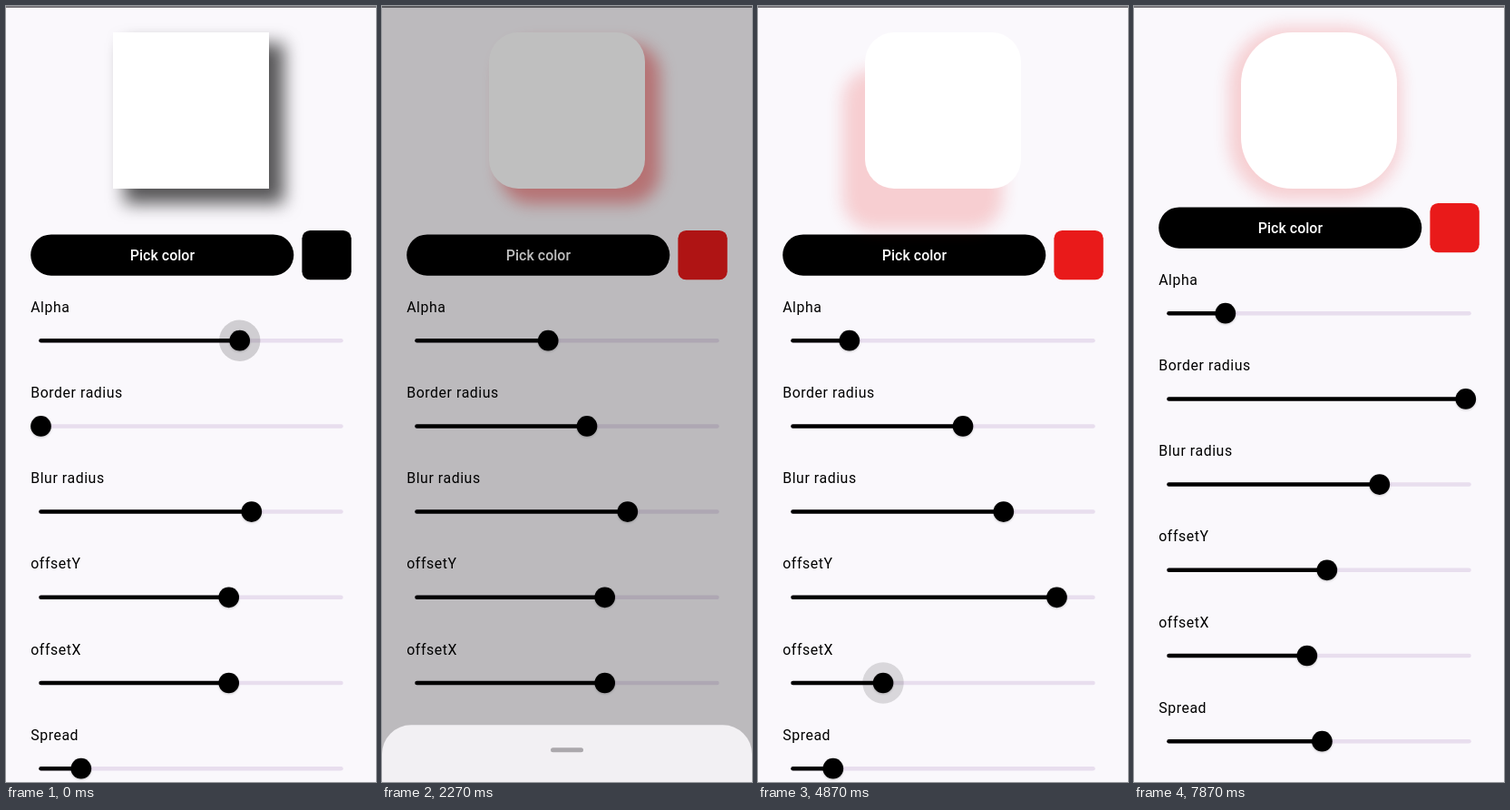
An HTML page for the animation above (8 s loop, 408x854 px).

```html
<!DOCTYPE html>
<html lang="en">
<head>
<meta charset="utf-8">
<title>Shadow playground</title>
<style>
  html, body { margin: 0; width: 100%; height: 100%; overflow: hidden; background: #faf8fc; }
  #stage { position: relative; width: 408px; height: 854px; overflow: hidden; }
  #stage div { position: absolute; box-sizing: border-box; }
  #panel { position: absolute; left: 0; top: 0; font: 15.87px Roboto, sans-serif; }
  .label { letter-spacing: .57px; }
  .caption { fill: #fff; font-weight: 500; letter-spacing: .06px; text-anchor: middle; }
  .track, .active { stroke: #e8deee; stroke-width: 4.53; stroke-linecap: round; }
  .active { stroke: #000; }
  .thumb { filter: drop-shadow(0 1px 1px #0003); }
  #box { left: 118px; top: 29px; width: 172px; height: 172px; background: #fff; }
  #bar { left: 0; top: 0; width: 408px; height: 2px; background: #77757a; }
  #scrim { inset: 0; background: #000; }
  #sheet { left: 0; top: 0; width: 408px; height: 461px; border-radius: 32px 32px 0 0; background: #f2f0f3; }
  #grip { left: 186px; top: 25px; width: 36px; height: 5px; border-radius: 3px; background: #aba8ac; }
  #shades, #hues, #opacity { border: 1px solid #999; }
  #shades { left: 27px; top: 72px; width: 309px; height: 328px; background: linear-gradient(#0000, #000), linear-gradient(90deg, #fff, #f00); }
  #hues { left: 344px; top: 72px; width: 37px; height: 375px; background: linear-gradient(#ff005c, #f0f 11%, #00f 28.8%, #0ff 46.6%, #0f0 64.4%, #ff0 82.2%, #f00); }
  #opacity { left: 27px; top: 408px; width: 309px; height: 38px; }
  .handle { border: 2px solid #fff; outline: 1px solid #777; border-radius: 1px; }
  #hueHandle { left: 343px; top: 441px; width: 39px; height: 7px; }
  #opacityHandle { left: 24px; top: 408px; width: 8px; height: 39px; }
  #cursor { width: 9px; height: 9px; margin: -4.5px; border: 1px solid #fff; outline: 1px solid #555; border-radius: 50%; }
</style>
</head>
<body>
<div id="stage">
  <svg id="panel" width="408" height="854">
    <g id="content">
      <rect id="button" x="27.2" y="251.4" width="290.1" height="45.3" rx="22.65"/>
      <text class="caption" x="172.4" y="280.4">Pick color</text>
      <rect id="swatch" x="326.4" y="246.9" width="54.4" height="54.4" rx="9"/>
    </g>
  </svg>
  <div id="box"></div>
  <div id="bar"></div>
  <div id="scrim"></div>
  <div id="sheet">
    <div id="grip"></div>
    <div id="shades"></div>
    <div id="hues"></div>
    <div id="opacity"></div>
    <div id="hueHandle" class="handle"></div>
    <div id="opacityHandle" class="handle"></div>
    <div id="cursor"></div>
  </div>
</div>
<script>
const LOOP = 8000, TRACK_LEFT = 38.5, TRACK_RIGHT = 369.5;
const $ = id => document.getElementById(id);
const mix = (a, b, p) => a + (b - a) * p;
const progress = (t, start, end) => Math.min(1, Math.max(0, (t - start) / (end - start)));
const smooth = p => p * p * (3 - 2 * p);

// Each drag is [start, end, thumb x at the end].
const sliders = [
  { label: 'Alpha', x: 257.7, drags: [[0, 400, 183.2], [3000, 3330, 100.8]] },
  { label: 'Border radius', x: 38.5, drags: [[500, 900, 226], [7270, 7730, 365.8]] },
  { label: 'Blur radius', x: 270.8, drags: [] },
  { label: 'offsetY', x: 245.7, drags: [[3935, 4125, 329.5], [6570, 6930, 212.8]] },
  { label: 'offsetX', x: 245.7, drags: [[4300, 4830, 138], [6130, 6450, 190.8]] },
  { label: 'Spread', x: 82.8, drags: [[5640, 5860, 207.4]] }
];

function add(tag, attributes) {
  const node = document.createElementNS('http://www.w3.org/2000/svg', tag);
  for (const name in attributes) node.setAttribute(name, attributes[name]);
  return $('content').appendChild(node);
}

sliders.forEach((slider, i) => {
  const y = 368.2 + i * 94.2;
  const line = { x1: TRACK_LEFT, x2: TRACK_RIGHT, y1: y, y2: y };
  add('text', { class: 'label', x: 27.2, y: y - 31.4 }).textContent = slider.label;
  add('line', { class: 'track', ...line });
  slider.active = add('line', { class: 'active', ...line });
  slider.halo = add('circle', { cy: y, r: 22.7 });
  slider.thumb = add('circle', { class: 'thumb', cy: y, r: 11.33 });
});

// Moves one slider and returns its value from 0 to 1.
function updateSlider(slider, t) {
  let x = slider.x, press = 0;
  for (const [start, end, target] of slider.drags) {
    x = mix(x, target, smooth(progress(t, start, end)));
    if (t >= start) press = 1 - progress(t, end + 20, end + 120);
  }
  slider.active.setAttribute('x2', x);
  slider.thumb.setAttribute('cx', x);
  slider.halo.setAttribute('cx', x);
  slider.halo.setAttribute('opacity', .17 * press);
  return (x - TRACK_LEFT) / (TRACK_RIGHT - TRACK_LEFT);
}

function draw(t) {
  const [alpha, corner, blur, offsetY, offsetX, spread] = sliders.map(s => updateSlider(s, t));

  const pick = smooth(progress(t, 1460, 2130));
  const saturation = .89 * pick, value = .914 * pick;
  const red = Math.round(255 * value), other = Math.round(red * (1 - saturation));
  const rgb = `${red},${other},${other}`;

  $('box').style.borderRadius = 57 * corner + 'px';
  $('box').style.boxShadow = `${113 * (offsetX - .5)}px ${113 * (offsetY - .5)}px ` +
    `${26 * blur}px ${17 * spread}px rgba(${rgb},${alpha})`;
  $('swatch').style.fill = `rgb(${rgb})`;
  $('button').style.fill = t >= 1200 && t < 1340 ? '#202020' : '#000';
  $('content').setAttribute('transform', `translate(0 ${-30 * smooth(progress(t, 5040, 5400))})`);

  const opening = smooth(progress(t, 1270, 1395));
  const closing = progress(t, 2205, 2276) ** 2;
  $('sheet').style.transform = `translateY(${mix(854, 393, opening - closing)}px)`;
  $('sheet').style.visibility = closing < 1 ? 'visible' : 'hidden';
  $('scrim').style.opacity = .32 * progress(t, 1270, 1420) * (1 - progress(t, 2215, 2470));

  $('cursor').style.left = 27 + 309 * saturation + 'px';
  $('cursor').style.top = 400 - 328 * value + 'px';
  $('opacity').style.background = `linear-gradient(90deg, rgb(${rgb}), rgba(${rgb},0)), ` +
    'repeating-conic-gradient(#cfcdd0 0 25%, #fff 0 50%) 0 0 / 22px 22px';
  $('opacityHandle').style.background = `rgb(${rgb})`;
}

function frame() {
  draw(performance.now() % LOOP);
  requestAnimationFrame(frame);
}
frame();
</script>
</body>
</html>
```
